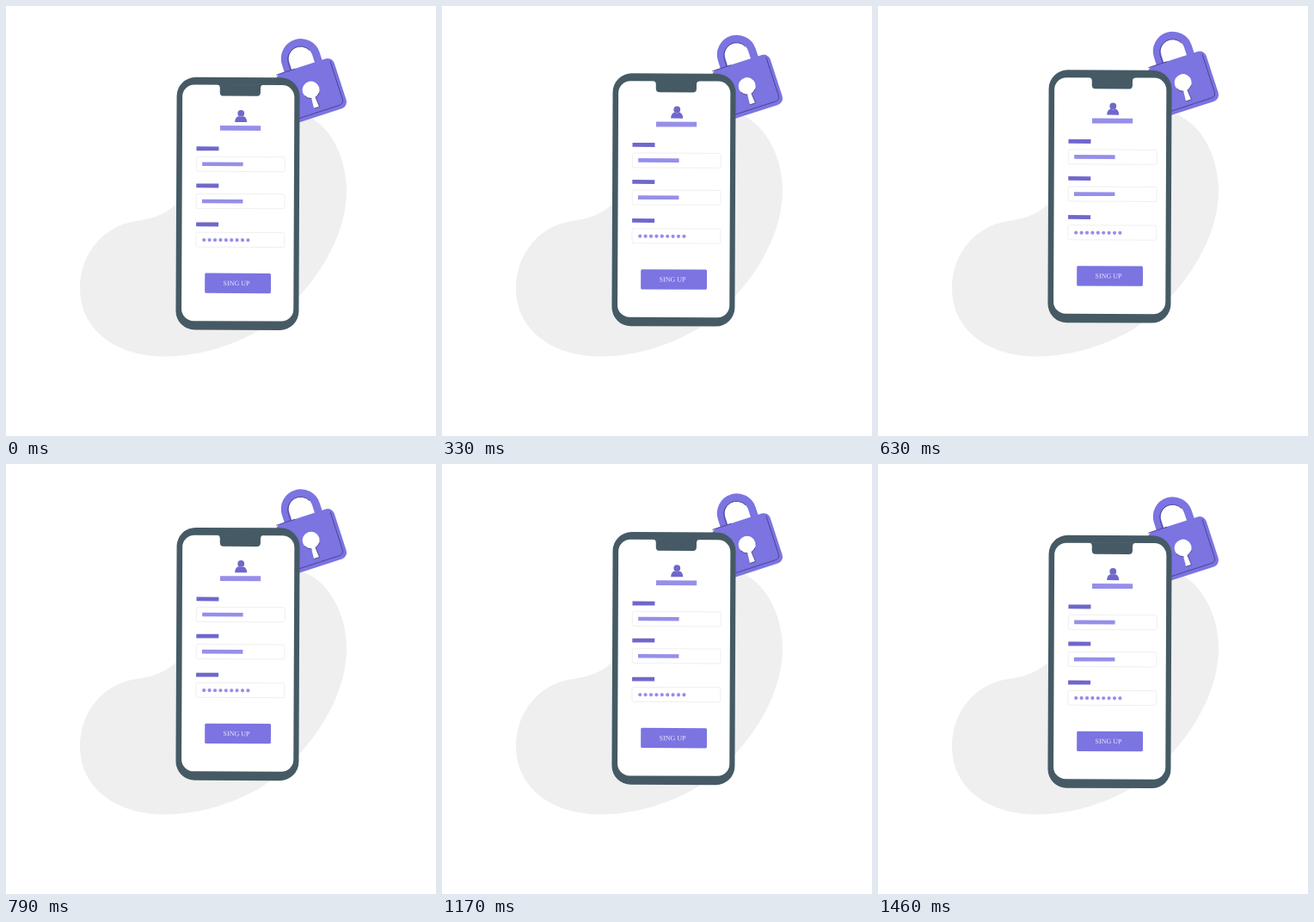
Animation of 500x500 px, one loop 1.5 s. Source, as an HTML page:

```html
<!DOCTYPE html>
<html lang="en">
<head>
<meta charset="utf-8">
<title>Floating sign-up form</title>
<style>
  html, body { margin: 0; height: 100%; overflow: hidden; background: #fff; }
  svg { display: block; width: 100vw; height: 100vh; }
  .main { fill: #7b74e1; }
  .light { fill: #968fea; }
  .dark { fill: #6f68cc; }
  .case { fill: #455a64; }
  .white { fill: #fff; }
  .line { fill: none; stroke: #443f86; stroke-width: .8; }
  .field { fill: none; stroke: #ebebeb; stroke-width: .8; }
  text { font: 8px "Liberation Serif", serif; fill: #eceafb; text-anchor: middle; }
</style>
</head>
<body>
<svg viewBox="0 0 500 500">
  <path fill="#efefef" d="M196 232C184 243 170 247 152 250C112 255 86 290 86 328C86 378 130 408 186 407.5C230 407 270 392 298 375C345 343 396 280 396 214C396 175 375 132 340 124C290 115 225 200 196 232Z"/>
  <g id="floating">
    <!-- padlock -->
    <g transform="translate(355 98.7) rotate(-18)">
      <path d="M-18.5 -28V-39.5a18.5 18.5 0 0 1 37 0V-28" fill="none" stroke="#7b74e1" stroke-width="9"/>
      <path class="line" d="M-15.3 -30.5V-39.5a14.8 14.8 0 0 1 28 -6"/>
      <rect class="main" x="-35.4" y="-30.4" width="70.8" height="61" rx="8"/>
      <path class="line" d="M-33 -30.2H-10M31.5 -26V20q0 6 -6 6H-25"/>
      <path class="white" d="M-2.4 7L-3.4 20.5H3.4L2.4 7Z"/>
      <circle class="white" cy="-1.2" r="10"/>
      <path class="line" d="M-3.4 20.5H3.4L2.4 8.6A10 10 0 0 0 8 5M-2.4 8.6A10 10 0 0 1 -9 3"/>
    </g>
    <!-- phone -->
    <g transform="rotate(.25 269.5 230)">
      <rect class="case" x="198" y="83" width="143" height="293.8" rx="22"/>
      <rect class="white" x="204.6" y="91.8" width="130.2" height="274.6" rx="14"/>
      <path class="case" d="M244 91.2q4.2 .4 4.2 4.3v5q0 4.2 4.2 4.2h38.8q4.2 0 4.2 -4.2v-5q0 -3.9 4.2 -4.3z"/>
      <circle class="dark" cx="272.8" cy="124.8" r="3.9"/>
      <path class="dark" d="M265.8 135c0 -4 2 -6.6 4.4 -6.8q2.6 1.4 5.2 0c2.4 .2 4.4 2.8 4.4 6.8z"/>
      <rect class="light" x="248.6" y="139.1" width="47.2" height="5.8"/>
      <g id="labels" class="dark">
        <rect x="221.2" y="163.6" width="26" height="4.8"/>
        <rect x="221.2" y="206.7" width="26" height="4.8"/>
        <rect x="221.2" y="251.7" width="26" height="4.8"/>
      </g>
      <g class="field">
        <rect x="221.2" y="175.5" width="102.8" height="17" rx="2"/>
        <rect x="221.2" y="218.6" width="102.8" height="17" rx="2"/>
        <rect x="221.2" y="263.4" width="102.8" height="17" rx="2"/>
      </g>
      <g class="light">
        <rect x="228" y="181.7" width="47.4" height="4.6"/>
        <rect x="228" y="224.9" width="47.4" height="4.6"/>
      </g>
      <path d="M230.4 272.2h51.3" stroke="#968fea" stroke-width="4.2" stroke-linecap="round" stroke-dasharray="0 6.4"/>
      <rect class="main" x="231.6" y="310.8" width="76.8" height="23.2" rx="1.5"/>
      <text x="268.4" y="325">SING UP</text>
    </g>
  </g>
</svg>
<script>
  const PERIOD = 1500, LEAD = 23, HEIGHT = 10;
  const floating = document.getElementById('floating');

  // Linear rise and fall
  function draw() {
    const phase = ((performance.now() + LEAD) / PERIOD) % 1;
    const lift = 1 - Math.abs(2 * phase - 1);
    floating.setAttribute('transform', `translate(0 ${0.3 - HEIGHT * lift})`);
    requestAnimationFrame(draw);
  }
  draw();
</script>
</body>
</html>
```
